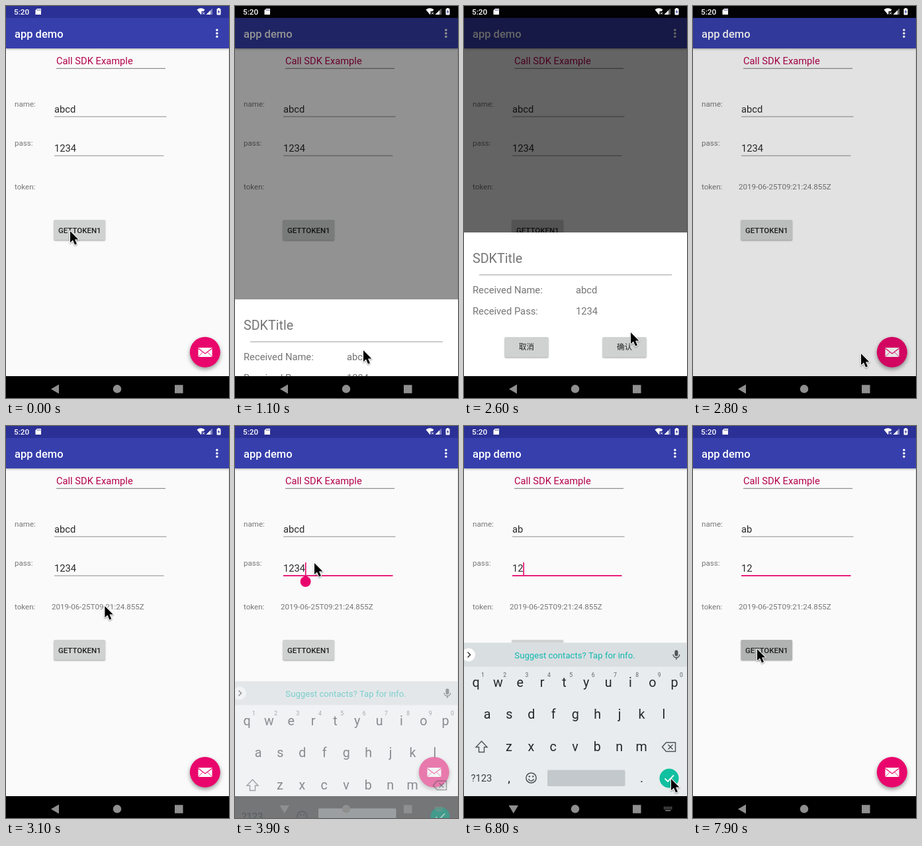
These frames come from a looping animation (337x592 px, 8 s). An HTML page with a canvas:

```html
<!DOCTYPE html>
<html lang="en">
<head>
<meta charset="utf-8">
<title>app demo</title>
<style>
html, body { margin: 0; width: 100%; height: 100%; overflow: hidden; background: #000; }
canvas { display: block; width: 337px; height: 592px; }
</style>
</head>
<body>
<canvas id="stage"></canvas>
<script>
const W = 337, H = 592, LOOP = 8000, STEP = 100;
const BAR_Y = 64, NAV_Y = 559;
const PINK = '#e9066c', ICON = '#4c5458';
const canvas = document.getElementById('stage');
const ratio = Math.max(1, window.devicePixelRatio || 1);
canvas.width = W * ratio;
canvas.height = H * ratio;
const c = canvas.getContext('2d');

const clamp = v => Math.max(0, Math.min(1, v));
const ramp = (t, start, length) => clamp((t - start) / length);
const smooth = p => p * p * (3 - 2 * p);

// [time, x, y] of the mouse pointer
const path = [
  [0, 97, 340], [500, 97, 340], [1100, 194, 520], [1500, 194, 520],
  [2300, 252, 493], [2600, 252, 493], [2800, 254, 525], [3200, 130, 225],
  [3300, 130, 225], [3500, 120, 207], [4500, 120, 207], [4800, 127, 161],
  [5700, 127, 161], [6300, 313, 533], [6900, 313, 533], [7600, 97, 337], [8000, 97, 337]
];

function pointerAt(t) {
  const i = Math.max(1, path.findIndex(k => k[0] > t));
  const a = path[i - 1], b = path[i];
  const p = smooth(ramp(t, a[0], b[0] - a[0]));
  return [a[1] + (b[1] - a[1]) * p, a[2] + (b[2] - a[2]) * p];
}

function rect(x, y, w, h, color) {
  c.fillStyle = color;
  c.fillRect(x, y, w, h);
}

function disc(x, y, r, color) {
  c.fillStyle = color;
  c.beginPath();
  c.arc(x, y, r, 0, Math.PI * 2);
  c.fill();
}

function trace(points, closed) {
  c.beginPath();
  points.forEach(([x, y], i) => i ? c.lineTo(x, y) : c.moveTo(x, y));
  if (closed) c.closePath();
}

function poly(points, color) {
  trace(points, true);
  c.fillStyle = color;
  c.fill();
}

function line(points, color, width = 1, closed = false) {
  trace(points, closed);
  c.strokeStyle = color;
  c.lineWidth = width;
  c.stroke();
}

function round(x, y, w, h, r, color) {
  c.fillStyle = color;
  c.beginPath();
  c.roundRect(x, y, w, h, r);
  c.fill();
}

function text(s, x, y, size, color, weight = 400, align = 'left') {
  c.font = `${weight} ${size}px Roboto, "Noto Sans CJK SC", "Noto Sans CJK", sans-serif`;
  c.textAlign = align;
  c.fillStyle = color;
  c.fillText(s, x, y);
  return c.measureText(s).width;
}

function shadowed(color, blur, dy, draw) {
  c.save();
  c.shadowColor = color;
  c.shadowBlur = blur * ratio;
  c.shadowOffsetY = dy * ratio;
  draw();
  c.restore();
}

function button(x, y, w, h, label, labelY, color) {
  shadowed('rgba(0,0,0,.35)', 2, 1, () => round(x, y, w, h, 1.5, color));
  text(label, x + w / 2, labelY, 11.5, '#202020', 500, 'center');
}

function statusBar(black) {
  rect(0, 0, W, 18, black ? '#020204' : '#2b3096');
  text('5:20', 12, 13, 11.8, '#fff', 500);
  poly([[47, 4], [53, 4], [53, 13], [44.5, 13], [44.5, 6.5]], '#fff');
  for (const x of [47, 49, 51]) rect(x, 5, 1, 2.2, '#555a9c');
  poly([[288.5, 5.5], [291.5, 3.8], [294.5, 3.3], [297.5, 3.8], [300.5, 5.5], [298.5, 8], [295.5, 8], [295.5, 11.8], [294.5, 13]], '#fff');
  line([[297, 9.5], [300, 12.5]], '#fff');
  line([[300, 9.5], [297, 12.5]], '#fff');
  poly([[302.5, 13], [312, 13], [312, 3.5]], 'rgba(255,255,255,.4)');
  poly([[302.5, 13], [309, 13], [309, 6.5]], '#fff');
  round(318.5, 4, 6, 9.5, 1, '#fff');
  rect(320.2, 3, 2.6, 1.5, '#fff');
  poly([[322, 5.5], [319.8, 9.2], [321.3, 9.2], [321, 12], [323.3, 8.3], [321.8, 8.3]], '#2b3096');
}

function field(value, x, y, right, focus, caret, handle, composing) {
  const w = text(value, x, y, 14.76, '#2b2b2b');
  if (composing) rect(x, y + 1.4, w, 1, '#444');
  if (focus) rect(x, y + 5.2, right - x, 1.8, PINK);
  else rect(x, y + 5.6, right - x, 1, '#8c8c8c');
  if (caret) rect(x + w - 0.2, y - 14, 1.6, 19, PINK);
  if (handle) {
    const hx = x + w + 0.5;
    disc(hx, y + 15, 8, PINK);
    poly([[hx, y + 5.6], [hx + 6.4, y + 11], [hx - 6.4, y + 11]], PINK);
  }
}

function fab() {
  shadowed('rgba(0,0,0,.4)', 6, 3, () => disc(300.8, 522.8, 23, PINK));
  rect(290.5, 516, 21, 14, '#fff');
  line([[290.5, 517], [301, 525], [311.5, 517]], PINK, 1.1);
  line([[290.5, 530], [297.5, 522.6]], PINK, 0.8);
  line([[311.5, 530], [304.5, 522.6]], PINK, 0.8);
}

function app(t) {
  rect(0, BAR_Y, W, NAV_Y - BAR_Y, '#fafafa');
  rect(336, BAR_Y, 1, NAV_Y - BAR_Y, '#e4e4e7');
  shadowed('rgba(0,0,0,.35)', 3, 1, () => rect(0, 18, W, BAR_Y - 18, '#363fac'));
  text('app demo', 13, 47.8, 16.5, '#fff', 500);
  for (const y of [36.3, 41.3, 46.3]) disc(318.8, y, 1.75, '#fff');

  text('Call SDK Example', 76, 88, 14.7, '#b3004b');
  rect(76, 93.8, 165, 1, '#777');
  text('name:', 13, 151.5, 11.6, '#777');
  text('pass:', 13, 210.5, 11.6, '#777');
  text('token:', 13, 277.3, 11.6, '#777');
  if (t >= 2650) text('2019-06-25T09:21:24.855Z', 69, 277.3, 11.6, '#777');

  const onName = t >= 5000 && t < 6400;
  const onPass = t >= 3700 && !onName;
  const name = t < 5150 ? 'abcd' : t < 5300 ? 'abc' : 'ab';
  const pass = t < 4200 ? '1234' : t < 4400 ? '123' : '12';
  const since = t < 4200 ? 3700 : t < 5000 ? 4400 : t < 5300 ? 5000 : t < 6400 ? 5300 : 6400;
  const caret = t < 6900 && Math.floor((t - since) / 500) % 2 === 0;
  field(name, 73, 161, 242.5, onName, onName && caret, onName && t < 5150, onName);
  field(pass, 73, 220, 238.5, onPass, onPass && caret, onPass && t < 4200, false);

  const press = t < 1000 ? ramp(t, 200, 200) * (1 - ramp(t, 600, 300)) : ramp(t, 7650, 200);
  const shade = Math.round(208 - 31 * press);
  button(72.5, 323, 77.5, 30.5, 'GETTOKEN1', 342.6, `rgb(${shade},${shade + 1},${shade + 1})`);
  fab();
}

function sheet(top) {
  c.save();
  c.beginPath();
  c.rect(0, 0, W, NAV_Y);
  c.clip();
  c.translate(0, top);
  rect(0, 0, W, NAV_Y - 342, '#fff');
  text('SDKTitle', 13, 46, 19.7, '#757575');
  rect(23, 63.5, 291, 1, '#9a9a9a');
  text('Received Name:', 13, 92.3, 14.76, '#757575');
  text('abcd', 169, 92.3, 14.76, '#757575');
  text('Received Pass:', 13, 124.3, 14.76, '#757575');
  text('1234', 169, 124.3, 14.76, '#757575');
  button(61.5, 158, 66, 30.5, '取消', 177.3, '#d0d2d2');
  button(209.5, 158, 66, 30.5, '确认', 177.3, '#d0d2d2');
  c.restore();
}

function keys(letters, x, y) {
  [...letters].forEach((k, i) => text(k, x + i * 33.35, y, 19.7, '#22282b', 400, 'center'));
}

function microphone() {
  round(318.4, 338.5, 5, 9, 2.5, ICON);
  c.strokeStyle = ICON;
  c.lineWidth = 1.4;
  c.beginPath();
  c.arc(320.9, 345, 4.8, 0, Math.PI);
  c.stroke();
  line([[320.9, 349.8], [320.9, 353]], ICON, 1.4);
}

function smiley(x, y) {
  c.strokeStyle = ICON;
  c.lineWidth = 1.5;
  c.beginPath();
  c.arc(x, y, 7.6, 0, Math.PI * 2);
  c.stroke();
  c.beginPath();
  c.arc(x, y + 0.5, 4, 0.25, Math.PI - 0.25);
  c.stroke();
  disc(x - 2.7, y - 2.2, 1.2, ICON);
  disc(x + 2.7, y - 2.2, 1.2, ICON);
}

function keyboard(t) {
  const closing = ramp(t, 6800, 150);
  const open = ramp(t, 3780, 240);
  if (!open || closing === 1) return;
  const typing = t >= 5300 && t < 6400;
  const next = t >= 5000 && t < 6400;

  c.save();
  c.globalAlpha = open * (1 - closing);
  c.translate(0, 116 * (1 - open));
  rect(0, 327.5, W, NAV_Y - 327.5, '#e8ecee');
  rect(0, 327.5, W, 36, '#d9dee1');
  disc(7, 345.5, 10, '#fff');
  line([[5.5, 341.5], [9.5, 345.5], [5.5, 349.5]], '#333', 1.5);
  if (typing) {
    [['ab', 74], ['about', 167], ['AB', 260]].forEach(([s, x]) =>
      text(s, x, 351, 14.76, '#565f64', 400, 'center'));
    rect(118, 336, 1, 19, '#bac1c5');
    rect(216.5, 336, 1, 19, '#bac1c5');
  } else {
    text('Suggest contacts? Tap for info.', 167.5, 351, 13.15, '#10b8ae', 400, 'center');
  }
  microphone();

  keys('qwertyuiop', 18, 394.3);
  [...'1234567890'].forEach((d, i) => text(d, 28.3 + i * 33.35, 378.5, 8.6, '#596267', 400, 'center'));
  keys('asdfghjkl', 35, 442);
  keys('zxcvbnm', 68, 490.5);

  line([[26.5, 476], [35, 485], [30.5, 485], [30.5, 492.5], [22.5, 492.5], [22.5, 485], [18, 485]], ICON, 1.4, true);
  line([[299.5, 484.8], [305.5, 478], [319.5, 478], [319.5, 491.5], [305.5, 491.5]], ICON, 1.5, true);
  line([[308.5, 481.3], [315.5, 488.3]], ICON, 1.5);
  line([[315.5, 481.3], [308.5, 488.3]], ICON, 1.5);

  text('?123', 10.5, 537, 14.76, '#3a4245');
  text(',', 68, 537.5, 19, '#22282b', 400, 'center');
  smiley(101.5, 531.5);
  round(126, 519.5, 117.5, 24.5, 2, '#c2c8cb');
  text('.', 268.5, 537.5, 19, '#22282b', 400, 'center');
  disc(310, 532, 14.5, '#10c0a0');
  if (next) {
    line([[302, 532], [314, 532]], '#fff', 1.7);
    line([[309.8, 527.5], [314.3, 532], [309.8, 536.5]], '#fff', 1.7);
    line([[317.7, 527], [317.7, 537]], '#fff', 1.7);
  } else {
    line([[303.5, 532.3], [308, 536.7], [317, 527.5]], '#fff', 1.8);
  }
  c.restore();
}

function navIcons(typing) {
  const gray = '#8f8f8f';
  if (typing) poly([[67.5, 573], [82, 573], [74.8, 585]], gray);
  else poly([[68, 578.5], [80, 571.5], [80, 585.5]], gray);
  disc(168, 578.3, 6.2, gray);
  rect(255, 572.3, 12.5, 12.5, gray);
  if (!typing) return;
  for (let i = 0; i < 6; i++)
    for (let j = 0; j < 2; j++) rect(302 + i * 2.2, 575 + j * 2.4, 1.3, 1.4, gray);
  rect(304.2, 580, 8, 1.4, gray);
}

function pointer(x, y) {
  c.save();
  c.translate(x, y);
  trace([[0, 0], [0, 17.3], [4, 13.6], [7, 20.6], [10, 19.3], [7, 12.5], [12.4, 12.5]], true);
  c.lineJoin = 'round';
  c.strokeStyle = '#fff';
  c.lineWidth = 2.2;
  shadowed('rgba(0,0,0,.4)', 2, 1, () => c.stroke());
  c.fillStyle = '#000';
  c.fill();
  c.restore();
}

function draw(t) {
  c.setTransform(ratio, 0, 0, ratio, 0, 0);
  app(t);
  const dim = 0.6 * ramp(t, 880, 315) * (1 - ramp(t, 2650, 180));
  if (dim) rect(0, 18, W, NAV_Y - 18, `rgba(0,0,0,${dim})`);
  statusBar(t >= 900 && t < 2900);
  rect(0, NAV_Y, W, H - NAV_Y, '#000');

  const rise = 1 - (1 - ramp(t, 1000, 315)) ** 2;
  const fall = ramp(t, 2650, 140) ** 2;
  if (rise && fall < 1) sheet(NAV_Y - 217 * rise * (1 - fall));

  keyboard(t);
  navIcons(t >= 3800 && t < 6950);
  pointer(...pointerAt(t));
}

const begin = performance.now();
function tick() {
  const t = (performance.now() - begin) % LOOP;
  draw(Math.floor(t / STEP) * STEP);
  requestAnimationFrame(tick);
}
tick();
</script>
</body>
</html>
```
